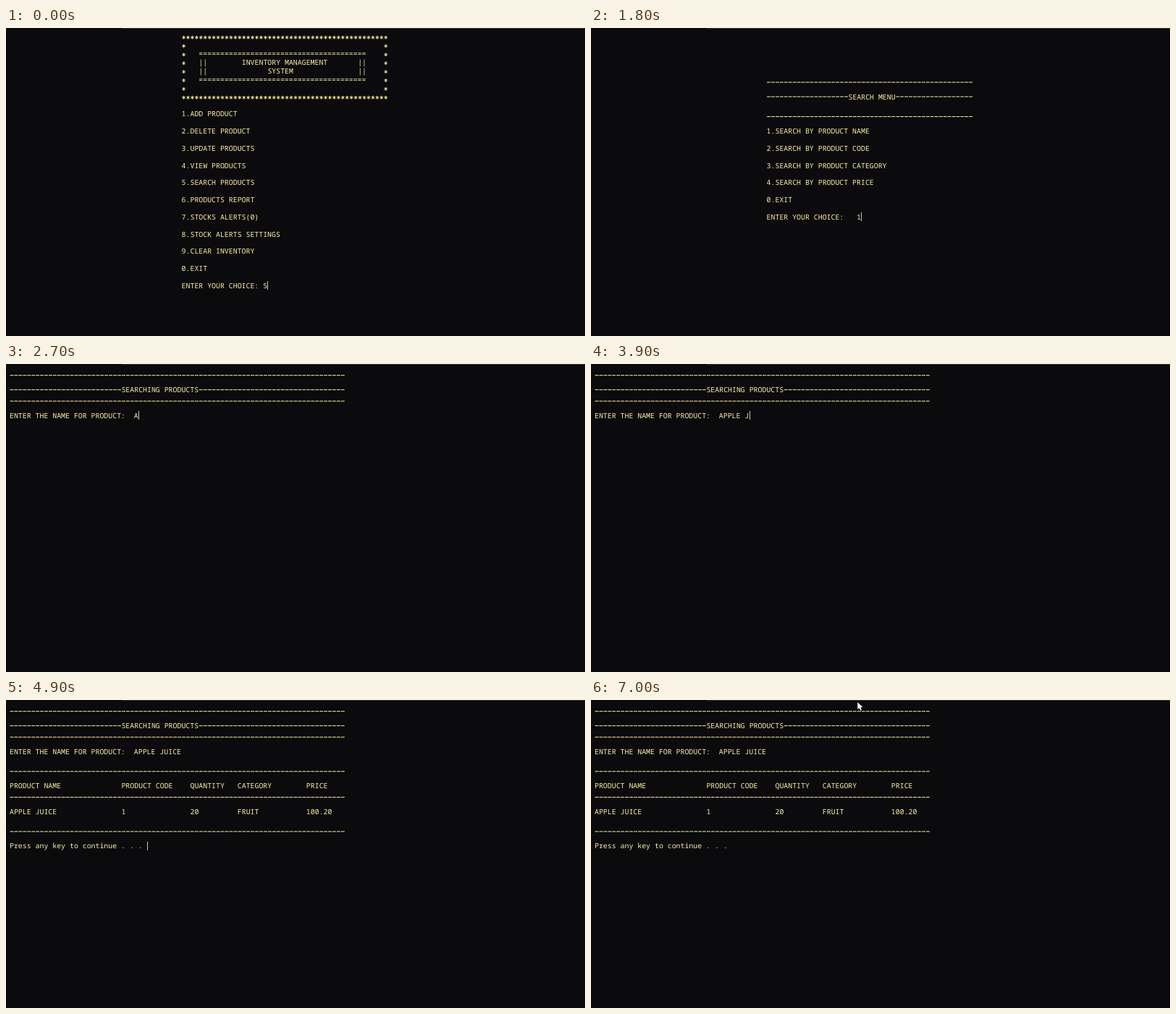
An HTML page with a canvas for the animation above (7100 ms loop, 800 px wide and 426 px high).

```html
<!DOCTYPE html>
<html lang="en">
<head>
<meta charset="utf-8">
<title>Inventory Management System</title>
<style>
  html, body { margin: 0; width: 100%; height: 100%; overflow: hidden; background: #0b0a0c; }
  canvas { display: block; }
</style>
</head>
<body>
<canvas id="stage" width="800" height="426"></canvas>
<script>
const ctx = document.getElementById('stage').getContext('2d');
const LOOP = 7100;
const LEFT = 5, CELL = 5.94, LINE = 11.875;
const INK = '#f9f1a5', PAPER = '#0b0a0c';
const BLINK = 530;
const MENU_COL = 40, MENU_WIDTH = 48, TABLE_WIDTH = 78;

const MENU = ['1.ADD PRODUCT', '2.DELETE PRODUCT', '3.UPDATE PRODUCTS', '4.VIEW PRODUCTS',
  '5.SEARCH PRODUCTS', '6.PRODUCTS REPORT', '7.STOCKS ALERTS(0)', '8.STOCK ALERTS SETTINGS',
  '9.CLEAR INVENTORY', '0.EXIT'];
const SEARCH = ['1.SEARCH BY PRODUCT NAME', '2.SEARCH BY PRODUCT CODE',
  '3.SEARCH BY PRODUCT CATEGORY', '4.SEARCH BY PRODUCT PRICE', '0.EXIT'];
const TABLE_COLS = [0, 26, 42, 53, 69];
const HEADINGS = ['PRODUCT NAME', 'PRODUCT CODE', 'QUANTITY', 'CATEGORY', 'PRICE'];
const PRODUCT = ['APPLE JUICE', '1', '20', 'FRUIT', '100.20'];

const AT = { search: 200, choice: 1600, product: 2200, result: 4900, pointer: 6300 };
const KEY_TIMES = [2600, 2900, 3100, 3300, 3500, 3700, 3900, 4100, 4300, 4500, 4700];

const colX = col => LEFT + col * CELL;
const rowY = row => row * LINE;

function text(col, row, string) {
  ctx.fillStyle = INK;
  ctx.fillText(string, colX(col), rowY(row) + 3.5);
}

function dashes(col, row, count, drop = 0) {
  ctx.fillStyle = INK;
  for (let i = 0; i < count; i++) {
    ctx.fillRect(colX(col + i) + 0.5, rowY(row) + drop - 0.5, CELL - 1, 1);
  }
}

const underline = (col, row, count) => dashes(col, row, count, 3.8);

function star(col, row) {
  const x = colX(col + 0.5), y = rowY(row) + 1.2;
  ctx.beginPath();
  for (let i = 0; i < 3; i++) {
    const angle = Math.PI * (i / 3 + 1 / 6 + 1 / 3 * (i === 3));
    const dx = 2.5 * Math.cos(angle), dy = 2.5 * Math.sin(angle);
    ctx.moveTo(x - dx, y - dy);
    ctx.lineTo(x + dx, y + dy);
  }
  ctx.strokeStyle = INK;
  ctx.lineWidth = 0.95;
  ctx.stroke();
}

function caret(col, row, age) {
  if (Math.floor(age / BLINK) % 2) return;
  ctx.fillStyle = '#c4c4c4';
  ctx.fillRect(Math.round(colX(col) - 0.3), Math.round(rowY(row) - 6), 1, 12);
}

function titledRule(col, row, before, title, after) {
  dashes(col, row, before);
  text(col + before, row, title);
  dashes(col + before + title.length, row, after);
}

function mainMenu(t) {
  const last = MENU_COL + MENU_WIDTH - 1;
  for (let col = MENU_COL; col <= last; col++) {
    star(col, 1);
    star(col, 8);
  }
  for (let row = 2; row < 8; row++) {
    star(MENU_COL, row);
    star(last, row);
  }
  for (const row of [3, 6]) text(44, row, '='.repeat(39));
  for (const row of [4, 5]) {
    text(44, row, '||');
    text(81, row, '||');
  }
  text(54, 4, 'INVENTORY MANAGEMENT');
  text(60, 5, 'SYSTEM');
  MENU.forEach((item, i) => text(MENU_COL, 10 + 2 * i, item));
  text(MENU_COL, 30, 'ENTER YOUR CHOICE: 5');
  caret(60, 30, t);
}

function searchMenu(t) {
  const chosen = t >= AT.choice;
  underline(MENU_COL, 6, MENU_WIDTH);
  titledRule(MENU_COL, 8, 19, 'SEARCH MENU', 18);
  underline(MENU_COL, 10, MENU_WIDTH);
  SEARCH.forEach((item, i) => text(MENU_COL, 12 + 2 * i, item));
  text(MENU_COL, 22, 'ENTER YOUR CHOICE:   ' + (chosen ? '1' : ''));
  caret(chosen ? 62 : 61, 22, t - (chosen ? AT.choice : AT.search));
}

function productSearch(t) {
  const typed = KEY_TIMES.filter(time => time <= t).length;
  underline(0, 1, TABLE_WIDTH);
  titledRule(0, 3, 26, 'SEARCHING PRODUCTS', 34);
  underline(0, 4, TABLE_WIDTH);
  text(0, 6, 'ENTER THE NAME FOR PRODUCT:  ' + PRODUCT[0].slice(0, typed));
  if (t < AT.result) {
    caret(29 + typed, 6, t - (typed ? KEY_TIMES[typed - 1] : AT.product));
    return;
  }
  for (const row of [8, 11, 15]) underline(0, row, TABLE_WIDTH);
  TABLE_COLS.forEach((col, i) => {
    text(col, 10, HEADINGS[i]);
    text(col, 13, PRODUCT[i]);
  });
  text(0, 17, 'Press any key to continue . . .');
  caret(32, 17, t - AT.result);
}

function pointer(t) {
  if (t < AT.pointer) return;
  const p = Math.min(1, (t - AT.pointer) / 500);
  const ease = 1 - (1 - p) ** 2;
  ctx.save();
  ctx.translate(368.3, -12 + 15 * ease);
  ctx.beginPath();
  [[0, 0], [0, 10], [2.3, 8], [3.9, 11.6], [5.7, 10.8], [4.1, 7.3], [7.2, 7.1]]
    .forEach(([x, y]) => ctx.lineTo(x, y));
  ctx.closePath();
  ctx.lineWidth = 1;
  ctx.strokeStyle = '#000';
  ctx.stroke();
  ctx.fillStyle = '#fff';
  ctx.fill();
  ctx.restore();
}

function draw(t) {
  ctx.fillStyle = PAPER;
  ctx.fillRect(0, 0, 800, 426);
  ctx.fillStyle = '#303030';
  ctx.fillRect(160, 0, 640, 1);
  ctx.font = '500 9.9px "Noto Sans Mono", monospace';
  ctx.textRendering = 'geometricPrecision';
  if (t < AT.search) mainMenu(t);
  else if (t < AT.product) searchMenu(t);
  else productSearch(t);
  pointer(t);
}

function tick() {
  draw(performance.now() % LOOP);
  requestAnimationFrame(tick);
}
tick();
</script>
</body>
</html>
```
